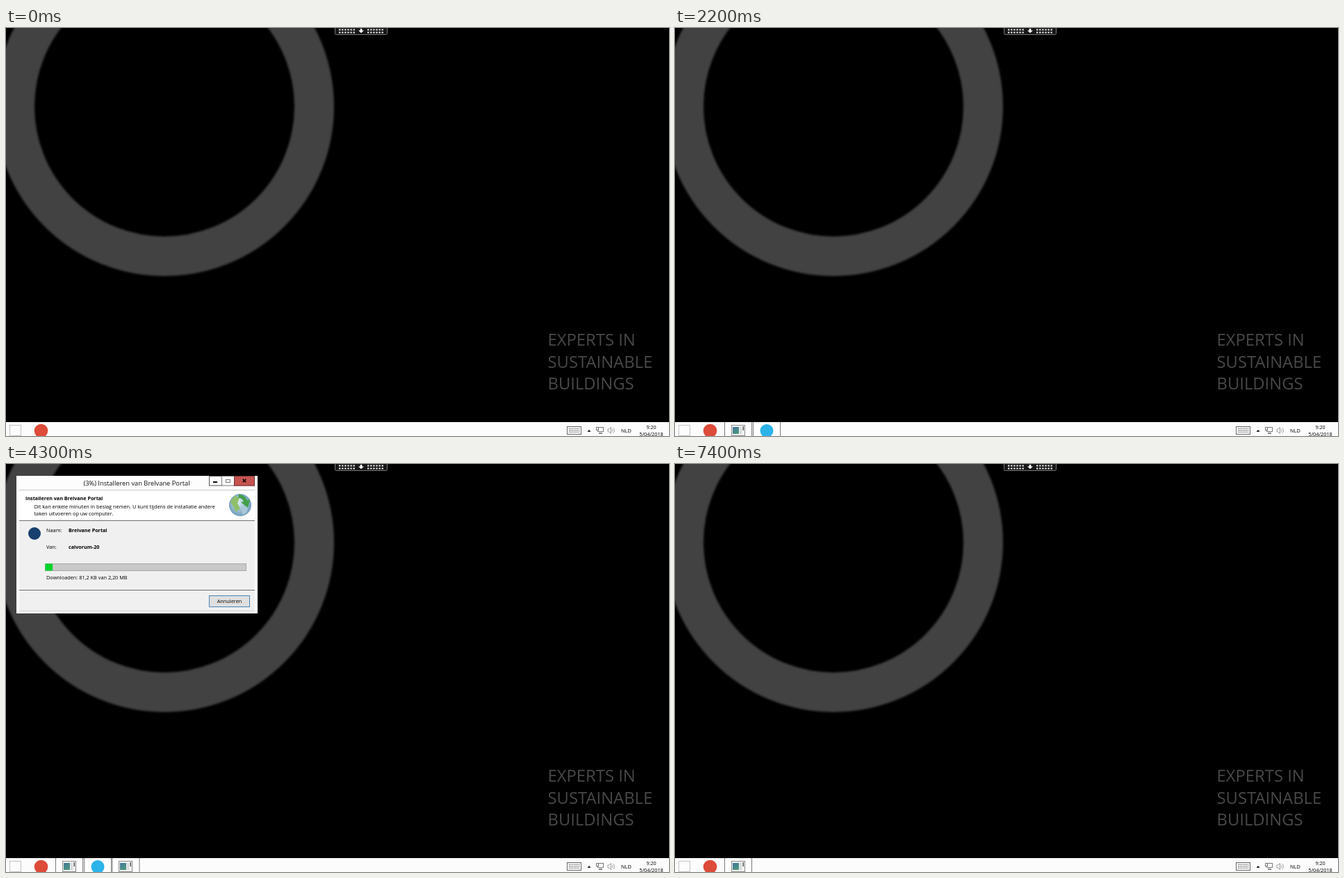
These frames come from a looping animation (954 px wide and 587 px high, 8 s). An HTML page with a canvas:

```html
<!DOCTYPE html>
<html lang="nl">
<head>
<meta charset="utf-8">
<title>Toepassing starten</title>
<style>
html, body { margin: 0; width: 100%; height: 100%; overflow: hidden; background: #000; }
canvas { display: block; width: 954px; height: 587px; }
</style>
</head>
<body>
<canvas id="stage" width="954" height="587"></canvas>
<script>
const ctx = document.getElementById('stage').getContext('2d');
const LOOP = 8000;
const APP = 'Brelvane Portal', HOST = 'calvorum-20';
const FACE = '"Open Sans", "Noto Sans", sans-serif';

function rect(x, y, w, h, fill, stroke) {
  if (fill) { ctx.fillStyle = fill; ctx.fillRect(x, y, w, h); }
  if (stroke) {
    ctx.strokeStyle = stroke;
    ctx.lineWidth = 1;
    ctx.strokeRect(x + .5, y + .5, w - 1, h - 1);
  }
}

function disc(x, y, r, fill, stroke) {
  ctx.beginPath();
  ctx.arc(x, y, r, 0, Math.PI * 2);
  if (fill) { ctx.fillStyle = fill; ctx.fill(); }
  if (stroke) { ctx.strokeStyle = stroke; ctx.lineWidth = 1; ctx.stroke(); }
}

function arc(x, y, r, from, to, color, width) {
  ctx.beginPath();
  ctx.arc(x, y, r, from, to);
  ctx.strokeStyle = color;
  ctx.lineWidth = width;
  ctx.stroke();
}

function line(color, width, ...p) {
  ctx.beginPath();
  ctx.moveTo(p[0], p[1]);
  for (let i = 2; i < p.length; i += 2) ctx.lineTo(p[i], p[i + 1]);
  ctx.strokeStyle = color;
  ctx.lineWidth = width;
  ctx.stroke();
}

function poly(fill, ...p) {
  ctx.beginPath();
  for (let i = 0; i < p.length; i += 2) ctx.lineTo(p[i], p[i + 1]);
  ctx.fillStyle = fill;
  ctx.fill();
}

function text(s, x, y, size = 7.35, color = '#000', weight = 400, align = 'left') {
  ctx.font = `${weight} ${size}px ${FACE}`;
  ctx.textAlign = align;
  ctx.fillStyle = color;
  ctx.fillText(s, x, y);
}

function faded(alpha, draw) {
  if (alpha <= 0) return;
  ctx.save();
  ctx.globalAlpha = alpha;
  draw();
  ctx.restore();
}

function radial(x, y, r, inner, outer) {
  const g = ctx.createRadialGradient(x - r * .3, y - r * .4, r * .1, x, y, r);
  g.addColorStop(0, inner);
  g.addColorStop(1, outer);
  return g;
}

function desktop() {
  rect(0, 0, 954, 587, '#000');
  ctx.save();
  ctx.filter = 'blur(1.5px)';
  arc(228, 113, 215.5, 0, Math.PI * 2, '#424242', 57);
  ctx.restore();
  ['EXPERTS IN', 'SUSTAINABLE', 'BUILDINGS'].forEach((s, i) =>
    text(s, 779.5, 457.4 + i * 31.4, 23.8, '#484848'));
}

function remoteBar() {
  ctx.beginPath();
  ctx.roundRect(473.5, -4, 75, 13.5, 2);
  ctx.fillStyle = '#181818';
  ctx.fill();
  ctx.strokeStyle = '#777';
  ctx.lineWidth = 1;
  ctx.stroke();
  for (const x of [479, 520])
    for (let i = 0; i < 12; i++)
      rect(x + (i % 6) * 4.1, i < 6 ? 1.5 : 5.5, 2.4, 2, '#eee');
  rect(509.7, 1, 2.6, 3, '#fff');
  poly('#fff', 507, 3.5, 515, 3.5, 511, 7.3);
}

function appIcon(x) {
  rect(x, 571, 20, 16, '#f4f4f4', '#8b8b8b');
  const g = ctx.createLinearGradient(x, 573, x + 8, 585);
  g.addColorStop(0, '#3d6fa8');
  g.addColorStop(1, '#4f9b78');
  rect(x + 2, 574, 9, 10, g);
  rect(x + 12, 574, 3, 10, '#d5dade');
  rect(x + 16.5, 573, 1.5, 6, '#555');
}

function taskItem(x, icon) {
  rect(x, 567, 39, 20, '#fff');
  rect(x - 1, 567, 1, 20, '#7a7a7a');
  rect(x + 38, 567, 1, 20, '#7a7a7a');
  icon();
}

function tray() {
  rect(807, 573, 21, 12, '#fff', '#666');
  for (let r = 0; r < 3; r++)
    for (let c = 0; c < 7; c++)
      rect(810 + c * 2.3, 575.5 + r * 2.6, 1.4, 1.4, '#777');
  poly('#222', 836.5, 581, 841.5, 581, 839, 577.8);
  rect(851, 574, 9, 7, '#fff', '#777');
  rect(853, 582, 5, 2, '#888');
  rect(849, 574, 4, 5, '#fff', '#777');
  ctx.beginPath();
  ctx.moveTo(866, 577);
  for (const [x, y] of [[868, 577], [870.5, 574.5], [870.5, 583.5], [868, 581], [866, 581]])
    ctx.lineTo(x, y);
  ctx.closePath();
  ctx.strokeStyle = '#888';
  ctx.lineWidth = .8;
  ctx.stroke();
  for (const r of [2.5, 5]) arc(870.5, 579, r, -.9, .9, '#888', .8);
  text('NLD', 885, 582, 7.4);
  text('9:20', 928.5, 576.5, 7.2, '#000', 400, 'center');
  text('5/04/2018', 928.5, 587, 7.3, '#000', 400, 'center');
}

function taskbar(s) {
  rect(0, 567, 954, 20, '#fcfcfc');
  rect(5, 571, 17, 16, '#fcfcfc', '#c4c4c4');
  disc(50.5, 579.5, 9.8, '#dd4b39');
  faded(s.first, () => taskItem(72, () => appIcon(81)));
  faded(s.browserItem, () => taskItem(113, () => disc(132, 579.5, 9.5, '#2bb3ea')));
  faded(s.appItem, () => taskItem(153.5, () => appIcon(162)));
  tray();
}

function closeButton(x, w, y) {
  rect(x, y, w, 14.5, '#c75450', '#6d3532');
  const cx = x + w / 2, cy = y + 7;
  line('#000', 1.5, cx - 2.3, cy - 2.3, cx + 2.3, cy + 2.3);
  line('#000', 1.5, cx + 2.3, cy - 2.3, cx - 2.3, cy + 2.3);
}

function browser() {
  rect(323, 54, 631, 512, '#fdfdfd');
  rect(888, 54, 19, 14, '#fff', '#333');
  rect(906, 54, 18, 14, '#fff', '#333');
  rect(896, 58, 5, 5, null, '#000');
  rect(894, 60, 5, 5, '#fff', '#000');
  rect(912, 59, 6, 5, null, '#000');
  closeButton(923, 31, 54);

  disc(340.5, 79, 12, '#fff', '#999');
  line('#aaa', 1, 347, 79, 334, 79);
  line('#aaa', 1, 339, 74, 334, 79, 339, 84);
  disc(363.5, 79, 8, '#fff', '#999');
  line('#aaa', 1, 359, 79, 368, 79);
  line('#aaa', 1, 364.5, 75.5, 368, 79, 364.5, 82.5);

  rect(374, 71, 153, 17, '#fff', '#999');
  disc(382, 79.5, 5, '#2bb3ea');
  disc(499.5, 78, 2.6, null, '#333');
  line('#333', 1.2, 497.5, 80, 495, 83);
  poly('#444', 506, 78.5, 511, 78.5, 508.5, 81);
  arc(519.5, 79.5, 3, -.2, 5, '#333', 1);
  poly('#333', 519.5, 74.5, 523, 75.5, 520.5, 78.5);

  rect(328, 89, 625, 1, '#999');
  rect(659, 71, 20, 18, '#d9d9d9', '#b5b5b5');
  rect(529, 71, 131, 19, '#fff');
  line('#999', 1, 529.5, 89, 529.5, 71.5, 659.5, 71.5, 659.5, 89);
  disc(538, 80.5, 5, '#2bb3ea');
  text('Lege pagina', 545.5, 83.5);
  line('#777', 1, 650, 78, 655, 83);
  line('#777', 1, 655, 78, 650, 83);

  line('#888', 1, 905, 79.5, 910, 74.5, 915, 79.5);
  line('#888', 1, 906.5, 79, 906.5, 83.5, 913.5, 83.5, 913.5, 79);
  ctx.beginPath();
  for (let i = 0; i < 10; i++) {
    const r = i % 2 ? 2.4 : 5.6, a = i * Math.PI / 5 - Math.PI / 2;
    ctx.lineTo(926 + r * Math.cos(a), 79 + r * Math.sin(a));
  }
  ctx.closePath();
  ctx.strokeStyle = '#888';
  ctx.lineWidth = 1;
  ctx.stroke();
  disc(942, 79, 4, null, '#888');
  disc(942, 79, 1.7, null, '#888');
  for (let i = 0; i < 8; i++) {
    const c = Math.cos(i * Math.PI / 4), s = Math.sin(i * Math.PI / 4);
    line('#888', 1.5, 942 + 4 * c, 79 + 4 * s, 942 + 5.6 * c, 79 + 5.6 * s);
  }

  [['Bestand', 334], ['Bewerken', 372], ['Beeld', 416], ['Favorieten', 445.5],
    ['Extra', 492], ['Help', 519]].forEach(([s, x]) => text(s, x, 99.5));
  rect(328, 103, 625, 1, '#777');
  rect(328, 560, 625, 1, '#d0d0d0');
}

function frame(w, h) {
  rect(15, 17, w, h, '#fdfdfd');
  rect(19, 37, w - 8, h - 24, '#f0f0f0');
  rect(19, 37, w - 8, 1, '#c8c8c8');
  rect(19, 13 + h, w - 8, 1, '#d0d0d0');
}

function globe(x, y, r) {
  disc(x, y, r, radial(x, y, r, '#5db8f5', '#0c3f9c'));
  ctx.save();
  ctx.beginPath();
  ctx.arc(x, y, r, 0, Math.PI * 2);
  ctx.clip();
  poly('#2d9a3c', x - r * .9, y - r * .3, x - r * .3, y - r * .9, x + r * .2, y - r * .7,
    x - r * .1, y - r * .1, x - r * .5, y + r * .1);
  poly('#2d9a3c', x + r * .2, y - r * .3, x + r * .8, y - r * .4, x + r * .7, y + r * .3,
    x + r * .2, y + r * .8, x, y + r * .2);
  ctx.restore();
}

function computer() {
  rect(68, 51, 11, 17, '#b9c3dc', '#8790b4');
  for (let i = 0; i < 3; i++) rect(71, 54 + i * 3, 6, 1, '#7680a8');
  poly('#dfe6f4', 57, 50, 71, 48, 74, 63, 60, 66);
  poly('#3fa0ee', 58.5, 51.5, 70, 50, 72.5, 61.5, 61, 63.5);
  poly('#8dd0fa', 58.5, 51.5, 70, 50, 62, 61);
  poly('#c5cde0', 62, 66, 72, 64, 75, 68, 63, 70);
}

function checking(reach) {
  frame(256, 102);
  closeButton(245, 22.5, 17);
  text('Toepassing starten', 143, 31, 9.3, '#111', 400, 'center');
  computer();
  globe(213, 59, 10.5);
  rect(68, 71.5, 145, 2, '#b4b4b4');
  rect(213 - reach, 71.5, reach, 2, '#5cb85c');
  rect(66, 71, 4.5, 3.5, '#d8473c');
  rect(210.5, 71, 4.5, 3.5, '#3ba04a');
  text('Verifiëren van toepassingsvereisten. Dit kan enkele ogenblikken', 31, 93.2);
  text('in beslag nemen.', 31, 103);
}

function installIcon() {
  disc(337, 59, 16, radial(337, 59, 16, '#e3f1f8', '#6f9cba'));
  poly('#8fbf6a', 323, 54, 329, 46, 336, 48, 333, 57, 337, 64, 331, 69);
  poly('#a9c9d9', 339, 60, 349, 61, 346, 70, 340, 73);
  arc(333, 59, 13, -1.45, -.35, '#43a047', 5);
  poly('#43a047', 338, 55, 351, 51, 348, 63);
}

function installing(part) {
  const pct = Math.floor(part * 100);
  const size = part < .4
    ? (part * 2200).toFixed(1).replace('.', ',') + ' KB'
    : (part * 2.2).toFixed(2).replace('.', ',') + ' MB';
  frame(347, 198);
  rect(292, 17, 19, 14.5, '#fff', '#555');
  rect(310, 17, 19, 14.5, '#fff', '#777');
  rect(298, 25, 6, 2, '#000');
  rect(316, 22, 7, 5, null, '#777');
  closeButton(328, 30, 17);
  text(`(${pct}%) Installeren van ${APP}`, 188, 31, 9.3, '#111', 400, 'center');

  rect(19, 38, 339, 43, '#fff');
  text('Installeren van ' + APP, 28, 52.3, 7.2, '#000', 700);
  text('Dit kan enkele minuten in beslag nemen. U kunt tijdens de installatie andere', 40.5, 64);
  text('taken uitvoeren op uw computer.', 40.5, 73.8);
  installIcon();
  rect(19, 81, 339, 1, '#707070');

  disc(41, 100, 9, '#17406f');
  text('Naam:', 58, 97.5);
  text(APP, 90, 97.5, 7.2, '#000', 700);
  text('Van:', 58, 122.3);
  text(HOST, 90, 122.3, 7.2, '#000', 700);
  rect(56, 143, 290, 11, '#c9c9c9', '#a8a8a8');
  rect(56.5, 143.5, 288 * part, 10, '#06d42b');
  text(`Downloaden: ${size} van 2,20 MB`, 58, 165.5);
  rect(19, 181, 339, 1, '#707070');
  rect(292, 189, 59, 17, '#dfdfdf', '#4a86b8');
  text('Annuleren', 321.5, 200.3, 7.35, '#000', 400, 'center');
}

const clamp = v => Math.max(0, Math.min(1, v));
const within = (t, a, b) => t >= a && t < b;

function draw(now) {
  // the screen refreshes ten times a second
  const t = Math.floor((now % LOOP) / 100) * 100;
  const open = clamp((t - 2700) / 400);
  const done = t < 4300 ? 0 : clamp(.0369 + (t - 4300) / 500 * .9631);

  desktop();
  if (within(t, 2100, 2200)) browser();
  taskbar({
    first: clamp((t - 400) / 200),
    browserItem: within(t, 2100, 7400) ? 1 : 0,
    appItem: t < 5300 ? open : 0
  });
  if (t < 4000)
    faded(open * clamp((4000 - t) / 300), () => checking(clamp((t - 3300) / 200) * 33));
  if (within(t, 4200, 5100))
    faded(t < 4300 || t >= 5000 ? .5 : 1, () => installing(done));
  remoteBar();
}

const start = performance.now();
function tick() {
  draw(performance.now() - start);
  requestAnimationFrame(tick);
}
tick();
</script>
</body>
</html>
```
